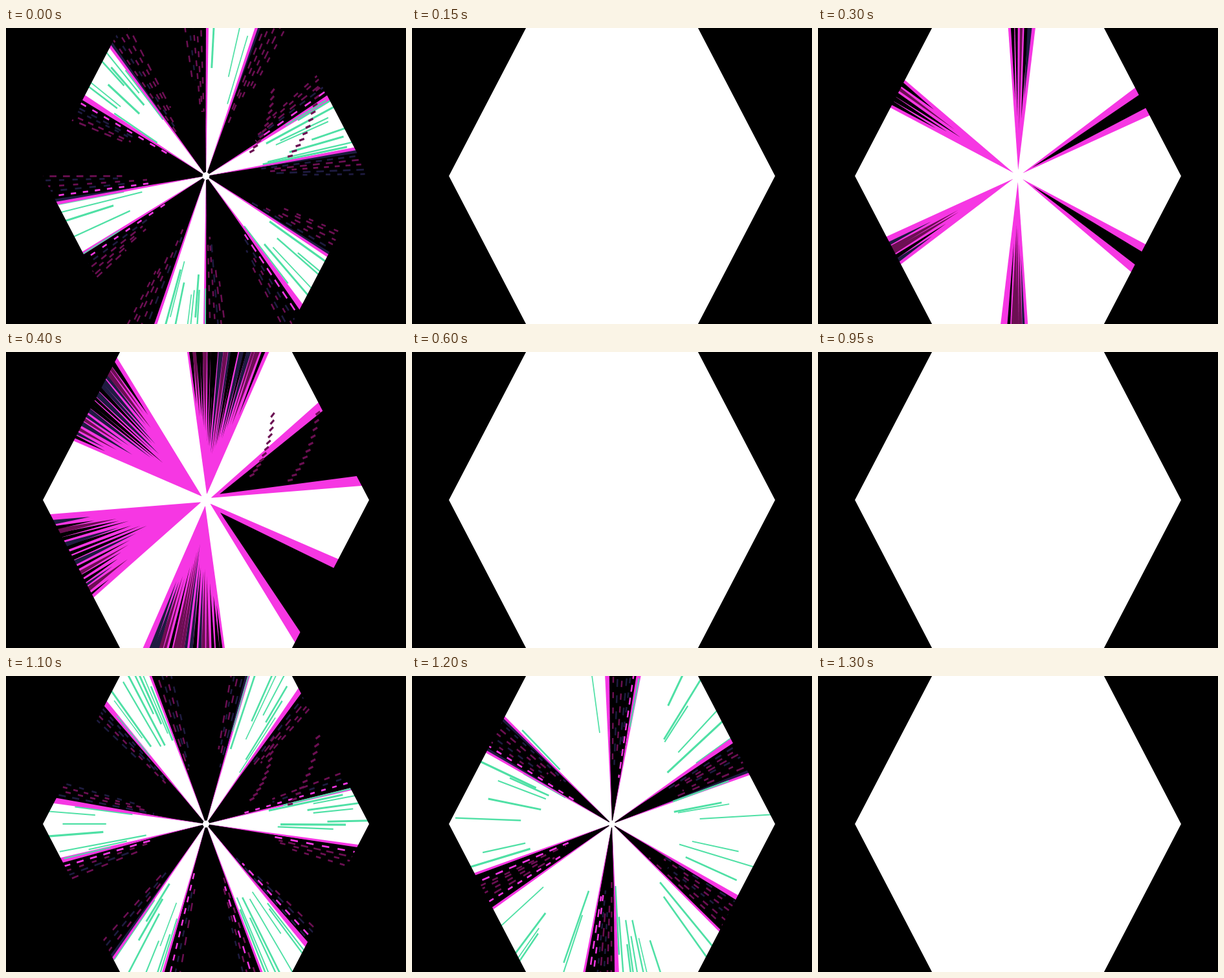
Write an HTML page with a canvas that moves like this. It is 618x458 px and loops after 1350 ms.

```html
<!DOCTYPE html>
<html lang="en">
<head>
<meta charset="utf-8">
<title>Spinning rays</title>
<style>
html, body { margin: 0; width: 100%; height: 100%; overflow: hidden; background: #000; }
canvas { display: block; width: 618px; height: 458px; }
</style>
</head>
<body>
<canvas id="stage" width="618" height="458"></canvas>
<script>
const ctx = document.getElementById('stage').getContext('2d');
const STEP = 50, STEPS = 27, CYCLE = 7;
const START = 40.6, TURN = 3.5;        // blade angle and its change per step, degrees
const RADIUS = 252, STRETCH = 1.11;    // regular hexagon, pulled taller
const RIM = 265, SECTOR = 60;
const WHITE = '#fff', BLACK = '#000', PINK = '#f637e3', PLUM = '#6b0f52', NAVY = '#1e1b40', MINT = '#4fe0a5';
const GLOW = [0.1, 1, 0.4, 0];         // pink afterglow in each cycle
const DIM = { cycle: 2, blade: 5 };    // the one blade that stays pink

let seed = 1;
function rnd(lo = 0, hi = 1) {
  seed = (seed * 16807) % 2147483647;
  return lo + (hi - lo) * seed / 2147483647;
}

const pick = (...list) => list[Math.floor(rnd(0, list.length))];
const rad = deg => deg * Math.PI / 180;
const at = (deg, r) => [r * Math.cos(rad(deg)), r * Math.sin(rad(deg))];

function poly(points, fill) {
  ctx.beginPath();
  points.forEach(p => ctx.lineTo(...p));
  ctx.closePath();
  ctx.fillStyle = fill;
  ctx.fill();
}

function wedge(mid, half, tip, fill) {
  poly([at(mid, tip), at(mid - half, 500), at(mid + half, 500)], fill);
}

// A ray that widens from a point at r0 to the rim.
function streak(deg, r0, color, width) {
  const half = width / RIM * 90 / Math.PI;
  poly([at(deg, r0), at(deg - half, RIM), at(deg + half, RIM)], color);
}

function ray(deg, r0, r1, color, width, dash = []) {
  ctx.beginPath();
  ctx.moveTo(...at(deg, r0));
  ctx.lineTo(...at(deg, r1));
  ctx.strokeStyle = color;
  ctx.lineWidth = width;
  ctx.setLineDash(dash);
  ctx.lineDashOffset = rnd(0, 20);
  ctx.stroke();
}

function drawGap(mid, half, glow) {
  const left = 0.5 - 0.5 * Math.cos(rad(mid));
  if (glow > 0.5) {
    wedge(mid, half, 8, PINK);
    const tip = 20 + 75 * left;
    if (left < 0.3) {
      wedge(mid, half - 3, tip, BLACK);
      return;
    }
    for (let d = -half + 2; d < half - 2; d += rnd(1.3, 2.3)) {
      const outer = Math.abs(d) / half;
      streak(mid + d, tip * rnd(0.9, 1.3) + outer * 80, pick(BLACK, BLACK, NAVY, PLUM), rnd(6, 11));
    }
    return;
  }
  wedge(mid, half, 0, BLACK);
  const solid = 1 + 7 * glow, span = Math.min(half, 8 + 22 * glow);
  for (const side of [-1, 1]) {
    const edge = mid + side * half;
    wedge(edge, 0.6 + 2 * glow, 0, PINK);
    for (let d = 0.8; d < span; d += rnd(1.2, 2.2)) {
      const deg = edge - side * d, r0 = 60 + d * 7 + rnd(-15, 30);
      if (d < solid) streak(deg, r0, pick(PINK, BLACK, NAVY), 5);
      else ray(deg, r0, RIM, pick(d < 4 ? PINK : PLUM, PLUM, NAVY), 2.5, [rnd(7, 12), rnd(8, 14)]);
    }
  }
}

// Mint streaks in the outer half, densest along the edges.
function drawMint(mid, half, amount) {
  for (let d = -half; d < half; d += rnd(1, 1.8)) {
    const edge = Math.abs(d) / half;
    if (rnd() > amount * (0.4 + 0.6 * edge)) continue;
    const r0 = rnd(120, 200) - 40 * edge;
    ray(mid + d, r0, r0 + rnd(60, 150), MINT, rnd(1.5, 3));
  }
}

function drawDim(mid) {
  wedge(mid, 17, 0, PINK);
  for (let d = -17; d < 17; d += 2.2) {
    streak(mid + d, rnd(90, 140), BLACK, 4 + Math.abs(d) / 4);
  }
  poly([at(mid, 0), at(mid - 4, 55), at(mid, 88), at(mid + 4, 55)], WHITE);
}

// Two dotted spirals at the upper right.
function drawBeads() {
  for (let j = 0; j < 2; j++) {
    for (let t = 0; t <= 1; t += 0.1) {
      const deg = -49 + 14 * j + 23 * t;
      const r = 157 + 54 * j - 78 * t;
      ray(deg, r - 4, r + 4, PLUM, 3);
    }
  }
}

function hexagon() {
  for (let i = 0; i < 6; i++) {
    const p = at(i * SECTOR, RADIUS);
    i ? ctx.lineTo(...p) : ctx.moveTo(...p);
  }
  ctx.closePath();
}

function draw(step) {
  const cycle = Math.floor((step + 1) / CYCLE);
  const peak = cycle ? cycle * CYCLE + 1 : 0;
  const open = [1, 0.75, 0.35][Math.abs(step - peak)] || 0;
  const glow = GLOW[cycle];
  const blade = (20 + 6 * glow) / 2;
  const gap = (SECTOR / 2 - blade) * open;
  const mint = 0.8 * (1 - glow) ** 2 * open;
  seed = 4711 + cycle * 97;

  ctx.setTransform(1, 0, 0, STRETCH, 309, 229);
  ctx.fillStyle = WHITE;
  ctx.fillRect(-309, -229, 618, 458);

  if (open) {
    for (let i = 0; i < 6; i++) {
      const mid = START + step * TURN + i * SECTOR;
      drawMint(mid, SECTOR / 2 - gap, mint);
      drawGap(mid + SECTOR / 2, gap, glow);
    }
    if (cycle === DIM.cycle && open === 1) {
      const mid = START + step * TURN + DIM.blade * SECTOR;
      wedge(mid, blade + 2, 0, BLACK);
      drawDim(mid);
    }
    if (open > 0.5) drawBeads();
    ctx.beginPath();
    ctx.arc(0, 0, 5 + 4 * glow, 0, 7);
    ctx.fillStyle = WHITE;
    ctx.fill();
  }

  // Black everywhere outside the hexagon.
  ctx.beginPath();
  ctx.rect(-400, -400, 800, 800);
  hexagon();
  ctx.fillStyle = BLACK;
  ctx.fill('evenodd');
}

let shown = -1;
function tick(now) {
  const step = Math.floor(now / STEP) % STEPS;
  if (step !== shown) draw(shown = step);
  requestAnimationFrame(tick);
}
draw(0);
requestAnimationFrame(tick);
</script>
</body>
</html>
```
